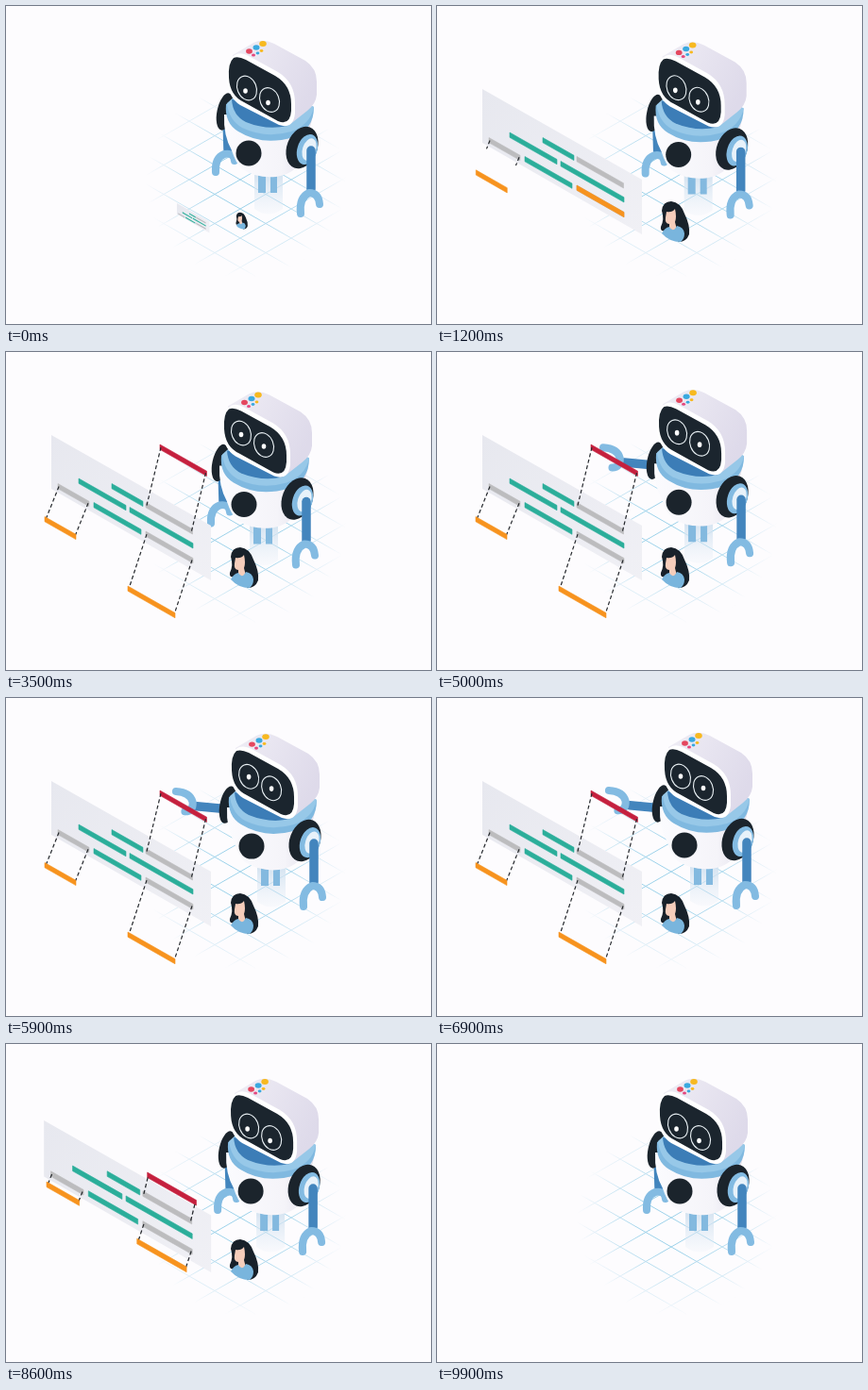
Write an HTML page that moves like this. It is 450 by 337 pixels and loops after 10 s.

```html
<!DOCTYPE html>
<html lang="en">
<head>
<meta charset="utf-8">
<title>Robot assistant</title>
<style>
  html, body { margin: 0; width: 100%; height: 100%; overflow: hidden; background: #fdfcfe; }
  svg { display: block; width: 100%; height: 100%; }
  .dash { stroke: #25282d; stroke-width: 1.2; stroke-dasharray: 4 2.6; }
  .claw { fill: none; stroke: #83bbe2; stroke-width: 8; stroke-linecap: round; stroke-linejoin: round; }
  .arm { stroke: #4385bd; stroke-width: 9.5; stroke-linecap: round; }
</style>
</head>
<body>
<svg viewBox="0 0 450 337" preserveAspectRatio="none">
  <defs>
    <radialGradient id="fade">
      <stop offset=".35" stop-color="#fff"/>
      <stop offset="1" stop-color="#fff" stop-opacity="0"/>
    </radialGradient>
    <mask id="floorMask" maskUnits="userSpaceOnUse" x="0" y="0" width="450" height="337">
      <ellipse cx="254" cy="186" rx="106" ry="102" fill="url(#fade)"/>
    </mask>
    <linearGradient id="panelFill" x2="1" y2="1">
      <stop stop-color="#e7e8ef"/><stop offset="1" stop-color="#f0f0f5"/>
    </linearGradient>
    <linearGradient id="side" x2="1" y2=".5">
      <stop stop-color="#efedf5"/><stop offset="1" stop-color="#dedaea"/>
    </linearGradient>
    <linearGradient id="torso" x2="1">
      <stop stop-color="#fbfbfe"/><stop offset=".65" stop-color="#f5f4f9"/><stop offset="1" stop-color="#e2e0ec"/>
    </linearGradient>
    <linearGradient id="beam" x2="0" y2="1">
      <stop stop-color="#cfe0ef"/><stop offset="1" stop-color="#e6eef7" stop-opacity=".2"/>
    </linearGradient>
  </defs>

  <g id="floor" mask="url(#floorMask)" stroke="#9dd2ea" stroke-width="1"></g>

  <g id="robot">
    <path d="M263 174H293V215Q278 226 263 215Z" fill="url(#beam)"/>
    <path d="M267 176H275V198H267ZM280 176H287V198H280Z" fill="#83b9df"/>

    <g id="leftArm">
      <path class="arm" d="M234 117L235 152"/>
      <path class="claw" d="M222 176Q221 161 231 157Q241 155 242 164"/>
    </g>
    <ellipse cx="232" cy="112" rx="8.5" ry="20" transform="rotate(12 232 112)" fill="#1b242c"/>

    <path d="M231 115Q230 137 239 153Q243 166 250 173Q266 183 286 181Q306 178 314 162L325 116Z" fill="url(#torso)"/>
    <path d="M233 104Q231 124 246 133Q272 149 304 139Q326 131 326 107L304 98H244Z" fill="#80b9e0"/>
    <path d="M234 103Q236 121 250 129Q275 141 302 133Q322 126 326 107L304 94H244Z" fill="#97c8e8"/>
    <path d="M239 99Q240 116 254 123Q276 132 298 127L302 110Z" fill="#3c7db7"/>
    <circle cx="257" cy="156" r="13.5" fill="#1b242c"/>

    <ellipse cx="313.5" cy="150" rx="16" ry="23" transform="rotate(21 313.5 150)" fill="#1b242c"/>
    <ellipse cx="319" cy="152" rx="10.5" ry="16.5" transform="rotate(18 319 152)" fill="#83bbe2"/>
    <ellipse cx="321" cy="152" rx="7" ry="12" transform="rotate(18 321 152)" fill="#e8f2fa"/>
    <path class="arm" d="M323 153V194"/>
    <path class="claw" d="M312 220Q310 203 321 198Q331 198 332 210"/>

    <path d="M240 52L262 39Q272 34 284 40L317 58Q329 66 329 80V94Q328 104 319 111L300 126L245 90Z" fill="url(#side)"/>
    <path d="M244 51Q250 49 257 53L288 70Q306 81 306 103V114Q304 131 289 126L248 105Q235 97 234 77Q233 56 244 51Z" fill="#fff"/>
    <path d="M241 55Q246 53 254 57L285 74Q302 84 302 104V111Q301 127 288 122L252 102Q237 95 236 76Q235 60 241 55Z" fill="#1b252e"/>

    <g id="eyes" fill="none" stroke="#e9f0f4" stroke-width="1.1">
      <ellipse cx="255" cy="87" rx="10" ry="13.3" transform="rotate(-22 255 87)"/>
      <ellipse cx="279" cy="99.5" rx="10" ry="13.3" transform="rotate(-22 279 99.5)"/>
      <g id="pupils" fill="#fff" stroke="none">
        <ellipse cx="255" cy="87" rx="2.3" ry="2.8"/>
        <ellipse cx="279" cy="99.5" rx="2.3" ry="2.8"/>
      </g>
    </g>
    <g id="buttons"></g>
  </g>

  <g id="panel">
    <path d="M48 88L217 184V242L48 145Z" fill="url(#panelFill)"/>
    <g id="bars"></g>
  </g>

  <g id="avatar">
    <path d="M238 217Q239 207 248 207Q258 208 262 220Q268 232 267 242Q264 250 256 250L244 238Q236 240 237 234Q241 226 238 217Z" fill="#18212a"/>
    <path d="M243 218Q249 219 252 215Q254 224 252 229L254 237Q250 242 246 236V231Q241 231 242 224Z" fill="#f5cdbb"/>
    <path d="M238 241Q241 235 246 234Q250 241 254 233Q261 234 262 241Q262 247 258 250Q246 250 238 241Z" fill="#79b5dd"/>
  </g>
</svg>
<script>
const LOOP = 10000, SLOPE = 0.57, BAR = 5.3;
const TEAL = '#2bae9a', GRAY = '#bcbcbe', ORANGE = '#f7931e', RED = '#c5203e';
const $ = id => document.getElementById(id);

function add(parent, tag, attrs) {
  const el = document.createElementNS('http://www.w3.org/2000/svg', tag);
  for (const key in attrs) el.setAttribute(key, attrs[key]);
  return parent.appendChild(el);
}

const clamp = p => Math.max(0, Math.min(1, p));
const sine = p => (1 - Math.cos(Math.PI * clamp(p))) / 2;
const ramp = (t, from, to) => sine((t - from) / (to - from));
const backIn = p => 2.7 * p ** 3 - 1.7 * p ** 2;
const backOut = p => 1 - backIn(1 - p);
const move = (el, x, y) => el.setAttribute('transform', `translate(${x} ${y})`);
const show = (el, on) => el.setAttribute('display', on ? 'inline' : 'none');

// Keys are [time, x, y], eased between neighbours.
function track(keys, t) {
  const i = Math.max(1, keys.findIndex(key => key[0] >= t));
  const [a, b] = [keys[i - 1], keys[i]];
  const k = ramp(t, a[0], b[0]);
  return [a[1] + (b[1] - a[1]) * k, a[2] + (b[2] - a[2]) * k];
}

function zoom(el, x, y, s) {
  el.setAttribute('transform', `translate(${x} ${y}) scale(${Math.max(0, s)}) translate(${-x} ${-y})`);
  show(el, s > 0.01);
}

const popScale = (t, lead, rise, out) =>
  t < out ? backOut(clamp((t + lead) / rise)) : 1 - backIn(clamp((t - out) / 750));

for (let i = -4; i <= 4; i++) {
  for (const side of [-1, 1]) {
    const x = 248 + side * i * 27, y = 184 + i * 15.5;
    add($('floor'), 'line', { x1: x - 108 * side, y1: y + 62, x2: x + 108 * side, y2: y - 62 });
  }
}

[[272, 40, 3.8, '#f7b920'], [265, 44, 3.5, '#39a9df'], [257.5, 48, 3.4, '#e4475f'],
 [270.5, 47.5, 1.9, '#f7b920'], [266.5, 50, 1.9, '#39a9df'], [262, 52, 2, '#e4477d']]
  .forEach(([cx, cy, rx, fill]) => add($('buttons'), 'ellipse', { cx, cy, rx, ry: rx * 0.78, fill }));

function bar(x, y, w, fill) {
  const d = `M${x} ${y}l${w} ${w * SLOPE}v${BAR}l${-w} ${-w * SLOPE}z`;
  return add($('bars'), 'path', { d, fill, stroke: fill, 'stroke-width': 0.6, 'stroke-linejoin': 'round' });
}

// Bars that slide out of a gray slot, joined to it by two dashed lines.
const sliders = [
  { x: 55, y: 139.5, w: 33, dx: -14, dy: 35, start: 700, color: ORANGE },
  { x: 148, y: 190, w: 50, dx: -19, dy: 58, start: 1250, color: ORANGE },
  { x: 148, y: 159.5, w: 49.5, dx: 15, dy: -61.5, start: 1900, color: RED, under: true }
];
for (const s of sliders) {
  const slot = () => bar(s.x, s.y, s.w, GRAY);
  const slide = () => { s.bar = bar(s.x, s.y, s.w, s.color); };
  const dashes = () => {
    s.lines = [1, s.w - 1].map(off => {
      const x = s.x + off, y = s.y + off * SLOPE + 2.5;
      return add($('bars'), 'line', { class: 'dash', x1: x, y1: y, x2: x, y2: y });
    });
  };
  (s.under ? [slide, slot, dashes] : [slot, dashes, slide]).forEach(step => step());
}
[[77, 134, 50], [112, 139.5, 33], [93, 159.5, 50], [131, 164.5, 67]]
  .forEach(([x, y, w]) => bar(x, y, w, TEAL));

const bodyKeys = [[0, 0, 0], [3500, -5, 5.5], [6900, 5, 0], [LOOP, 0, 0]];
const eyeKeys = [[0, 0, 0], [3500, -1, -6.5], [5000, 0, -5.5], [6900, -2, -4], [8400, 0, 0], [LOOP, 0, 0]];
const pupilKeys = [[0, -1.5, 3], [3500, 0, 1.5], [6900, 0, 0], [8400, -1.5, 3], [LOOP, -1.5, 3]];

function render(t) {
  move($('robot'), ...track(bodyKeys, t));
  move($('eyes'), ...track(eyeKeys, t));
  move($('pupils'), ...track(pupilKeys, t));

  const raise = ramp(t, 3700, 4700) - ramp(t, 7100, 8200);
  $('leftArm').setAttribute('transform', `rotate(${97 * raise} 234 117)`);

  zoom($('panel'), 215, 240, popScale(t, 30, 670, 8450));
  zoom($('avatar'), 248, 227, popScale(t, 65, 650, 8600));

  const back = 1 - ramp(t, 8100, 8900);
  for (const s of sliders) {
    const out = ramp(t, s.start, s.start + 550) * back;
    const drawn = Math.min(out, ramp(t, s.start + 300, s.start + 900));
    move(s.bar, s.dx * out, s.dy * out);
    show(s.bar, t > s.start - 100 && t < 8950);
    for (const line of s.lines) {
      line.setAttribute('x2', +line.getAttribute('x1') + s.dx * drawn);
      line.setAttribute('y2', +line.getAttribute('y1') + s.dy * drawn);
      show(line, drawn > 0.01);
    }
  }
}

const began = performance.now();
function tick() {
  render((performance.now() - began) % LOOP);
  requestAnimationFrame(tick);
}
render(0);
requestAnimationFrame(tick);
</script>
</body>
</html>
```
